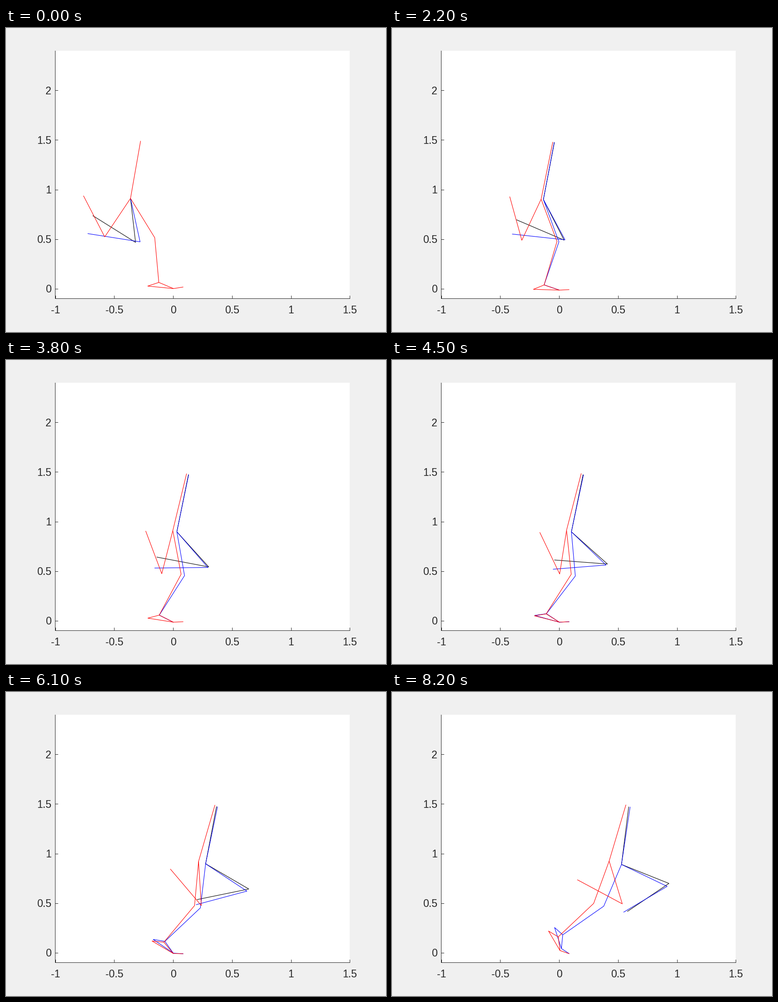
Write a matplotlib script that moves like this. It is 837 px wide and 669 px high and loops after 8300 ms.

```python
import numpy as np
import matplotlib.pyplot as plt
from matplotlib.animation import FuncAnimation

W, H, DPI = 837, 669, 64
PX = 72 / DPI          # one pixel in points
FRAMES, STEP_MS = 83, 100
INK = "#262626"
STEPS = np.arange(FRAMES)

# Steps at which the angles below (in degrees) are given.
KEYS = [0, 30, 52, 82]

LENGTH = dict(flex=0.085, foot=0.139, shank=0.4525, thigh=0.447, trunk=0.586,
              swing_thigh=0.446, swing_shank=0.453)

RED = dict(
    flex=[190.8, 183.1, 181.5, 158],
    foot=[153.4, 154.7, 135.9, 96.3],
    shank=[94.4, 70.6, 58.6, 48.3],
    thigh=[117.4, 103.4, 91, 72.9],
    trunk=[81.6, 79.4, 77, 75.9],
    swing_thigh=[-119.4, -107.1, -92.9, -75.5],
    swing_shank=[113.5, 104.3, 117.3, 147.5],
)
BLUE = dict(
    flex=[190.8, 183.1, 181.5, 142],
    foot=[153.4, 154.7, 133.5, 85.3],
    shank=[94.4, 67.5, 53, 39.7],
    thigh=[117.4, 102.9, 90, 70.3],
    trunk=[81.6, 80.5, 79.8, 82.8],
    swing_thigh=[-79.5, -59.8, -43.8, -29.7],
    swing_shank=[169.4, 176.2, 190.5, 215.2],
)
# The black figure stands on the same leg as the blue one.
BLACK = dict(
    BLUE,
    trunk=[81.6, 80.5, 80.4, 84],
    swing_thigh=[-84.5, -59.7, -41.1, -25.4],
    swing_shank=[143.4, 159.6, 182.9, 218.7],
)


def to_px(x, y):
    return 368.2 + 259.4 * x, 573.6 - 218.1 * y


def walk(angles):
    """Strokes of one figure in pixels, each shaped (step, point, xy)."""
    def limb(part, turn=0, length=None):
        a = np.polyval(np.polyfit(KEYS, angles[part], 3), STEPS) + turn
        a = np.radians(a)
        return (length or LENGTH[part]) * np.stack([np.cos(a), np.sin(a)], 1)

    # The toe settles into the ground as the weight comes on.
    toe_y = -0.011 + 0.0275 * np.exp(-STEPS / 7)
    toe = np.stack([np.full(FRAMES, 0.086), toe_y], 1)
    ball = toe + limb("flex")
    heel = ball + limb("foot", turn=20, length=0.22)
    ankle = ball + limb("foot")
    knee = ankle + limb("shank")
    hip = knee + limb("thigh")
    head = hip + limb("trunk")
    swing_knee = hip + limb("swing_thigh")
    swing_ankle = swing_knee + limb("swing_shank")

    strokes = [(toe, ball, heel, ankle), (ball, ankle, knee, hip),
               (hip, head), (hip, swing_knee, swing_ankle)]
    return [np.stack(to_px(*np.moveaxis(np.stack(s, 1), 2, 0)), axis=2)
            for s in strokes]


def hide_covered(strokes, front):
    """Blank the steps where a stroke lies exactly under the one in front."""
    for below, above in zip(strokes, front):
        below[np.abs(below - above).max(axis=(1, 2)) < 0.3] = np.nan


fig = plt.figure(figsize=(W / DPI, H / DPI), dpi=DPI, facecolor="#f0f0f0")
ax = fig.add_axes([0, 0, 1, 1])
ax.set_xlim(0, W)
ax.set_ylim(H, 0)
ax.axis("off")

LEFT, RIGHT, TOP, BOTTOM = 108.5, 757, 49.5, 594.5
ax.add_patch(plt.Rectangle((LEFT, TOP), RIGHT - LEFT, BOTTOM - TOP,
                           fc="white", ec="none"))


def rule(x, y):
    ax.plot(x, y, color=INK, lw=PX, solid_capstyle="projecting", zorder=2)


def label(x, y, value, align):
    ax.text(x, y, f"{value:g}", color=INK, family="Liberation Sans",
            size=23 * PX, ha=align, va="baseline")


rule([LEFT, LEFT], [TOP, BOTTOM])
rule([LEFT, RIGHT], [BOTTOM, BOTTOM])
for value in np.arange(-1, 1.6, 0.5):
    x, _ = to_px(value, 0)
    rule([x, x], [BOTTOM - 6, BOTTOM])
    label(x, 628, value, "center")
for value in np.arange(0, 2.1, 0.5):
    _, y = to_px(0, value)
    rule([LEFT, LEFT + 6], [y, y])
    label(100, y + 8.5, value, "right")

black, blue, red = walk(BLACK), walk(BLUE), walk(RED)
hide_covered(black, blue)
hide_covered(blue, red)

walkers = []
for order, (strokes, color) in enumerate(
        [(black, "black"), (blue, "blue"), (red, "red")]):
    for path in strokes:
        line, = ax.plot([], [], color=color, lw=1.1 * PX, zorder=3 + order,
                        solid_capstyle="butt", solid_joinstyle="round")
        walkers.append((line, path))


def update(step):
    for line, path in walkers:
        line.set_data(path[step, :, 0], path[step, :, 1])
    return [line for line, _ in walkers]


anim = FuncAnimation(fig, update, frames=FRAMES, interval=STEP_MS,
                     repeat=True, repeat_delay=0, blit=False)
plt.show()
```
